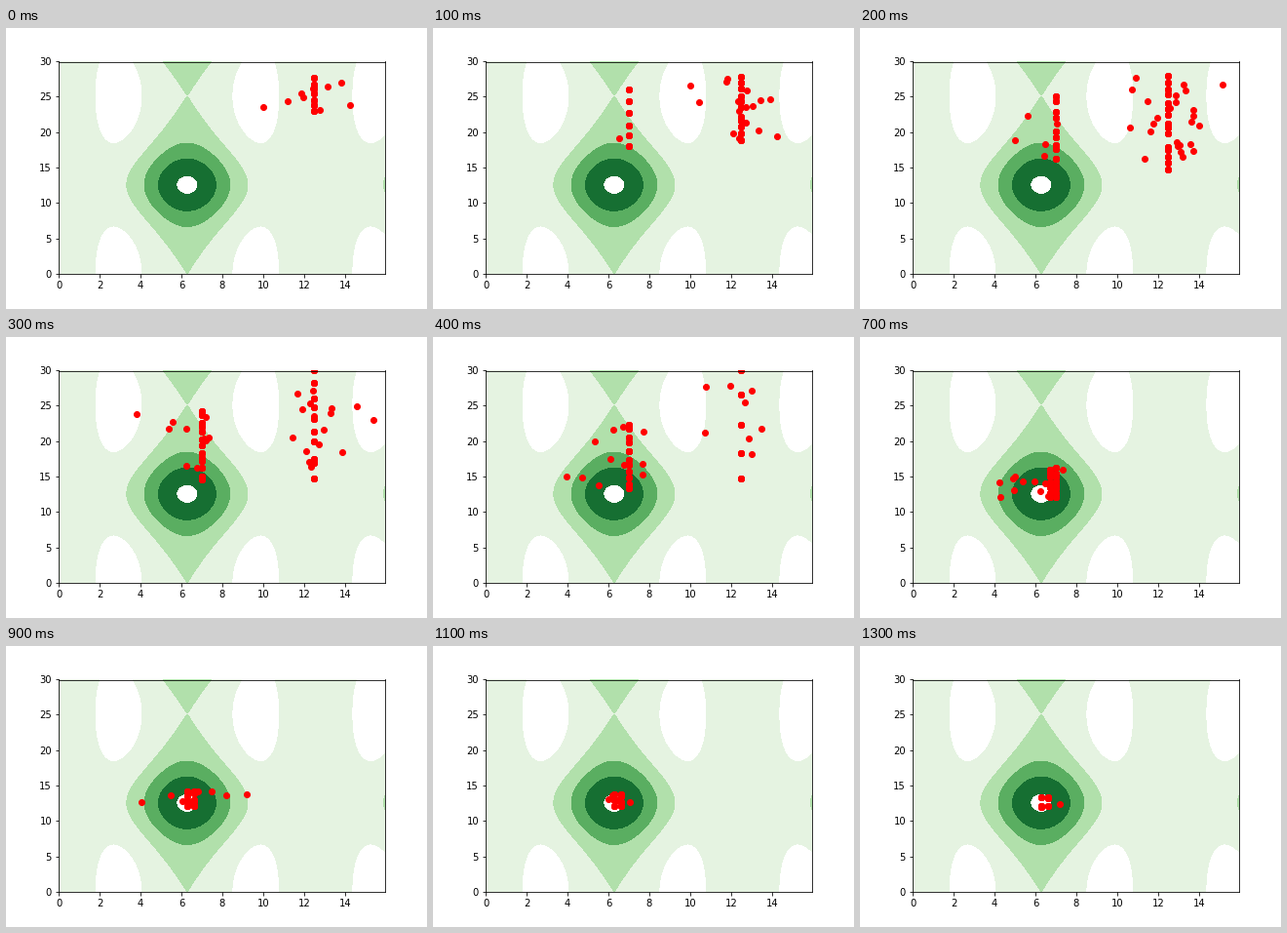
A matplotlib script for the animation above (1.4 s loop, 432 px wide and 288 px high).

```python
import numpy as np
import matplotlib.pyplot as plt
from matplotlib.animation import FuncAnimation

STEPS, STEP_MS = 14, 100
GRID_STEP = .05
xs, ys = np.arange(0, 16, GRID_STEP), np.arange(0, 30, GRID_STEP)


def fitness(x, y):
    """Wavy landscape with its peak at (2 pi, 4 pi)."""
    return np.exp(-np.cos(x / 2) - np.cos(y / 4)) + np.cos(x)


def keyed(step, *keys):
    """Interpolate between (step, value) key points."""
    return np.interp(step, *zip(*keys))


def column(rng, x, low, high, count):
    """Crowded individuals that share x; duplicates lie on one another."""
    y = np.linspace(low, high, count)
    y[1:-1] += rng.normal(0, .25, max(count - 2, 0))
    return np.tile(np.column_stack([np.full(count, x), y]), (4, 1))


def cloud(rng, x, spread, low, high, count):
    """Loose individuals around x."""
    offset = np.clip(rng.normal(0, spread, count), -2.7, 2.7)
    return np.column_stack([x + offset, rng.uniform(low, high, count)])


def population(step):
    """An old group dies out while a new one closes in on the peak."""
    rng = np.random.default_rng(step)

    low = keyed(step, (0, 23), (2, 14.7))
    high = keyed(step, (0, 27.7), (2, 28), (3, 30))
    crowd = int(keyed(step, (0, 7), (2, 15), (3, 10), (5, 0)))
    loose = int(keyed(step, (0, 9), (2, 26), (3, 16), (5, 0)))
    old = [column(rng, 12.5, low, high, crowd),
           cloud(rng, 12.7, 1.2, max(low, 16), min(high, 28), loose)]

    x = keyed(step, (7, 7), (9, 6.6))
    low = keyed(step, (1, 18), (3, 14.6), (5, 12.1))
    high = keyed(step, (1, 26), (3, 24.2), (5, 20.5), (7, 16.3), (9, 14.2),
                 (13, 13.3))
    spread = keyed(step, (9, 1.2), (13, .7))
    crowd = int(keyed(step, (0, 0), (1, 6), (3, 13), (5, 11), (9, 6), (13, 3)))
    loose = int(keyed(step, (0, 0), (1, 1), (3, 10), (6, 15), (9, 8), (13, 1)))
    side = crowd if step >= 5 else 0
    new = [column(rng, x, low, high, crowd),
           column(rng, x - .3, low, min(high, 16), side),
           cloud(rng, 6.5, spread, low, high, loose)]
    return np.vstack(old + new)


plt.rcParams.update({"font.family": "DejaVu Sans", "font.size": 10})
fig = plt.figure(figsize=(6, 4), dpi=72, facecolor="white")

# The landscape ends just below 30, but the top tick keeps its label.
ax = fig.add_axes([.125, .125, .775, .755 * 30 / ys[-1]])
ax.spines["top"].set_position(("data", ys[-1]))

z = fitness(*np.meshgrid(xs, ys))
ax.contourf(xs, ys, z, levels=[0, 2, 4, 6, 8], cmap="PRGn",
            vmin=-z.max(), vmax=z.max())
ax.set(xlim=(0, xs[-1]), ylim=(0, 30),
       xticks=range(0, 15, 2), yticks=range(0, 31, 5))
dots = ax.scatter([], [], s=36, color="red", linewidths=1)


def update(step):
    dots.set_offsets(population(step))
    return dots,


anim = FuncAnimation(fig, update, frames=STEPS, interval=STEP_MS,
                     repeat=True, repeat_delay=0)
plt.show()
```
